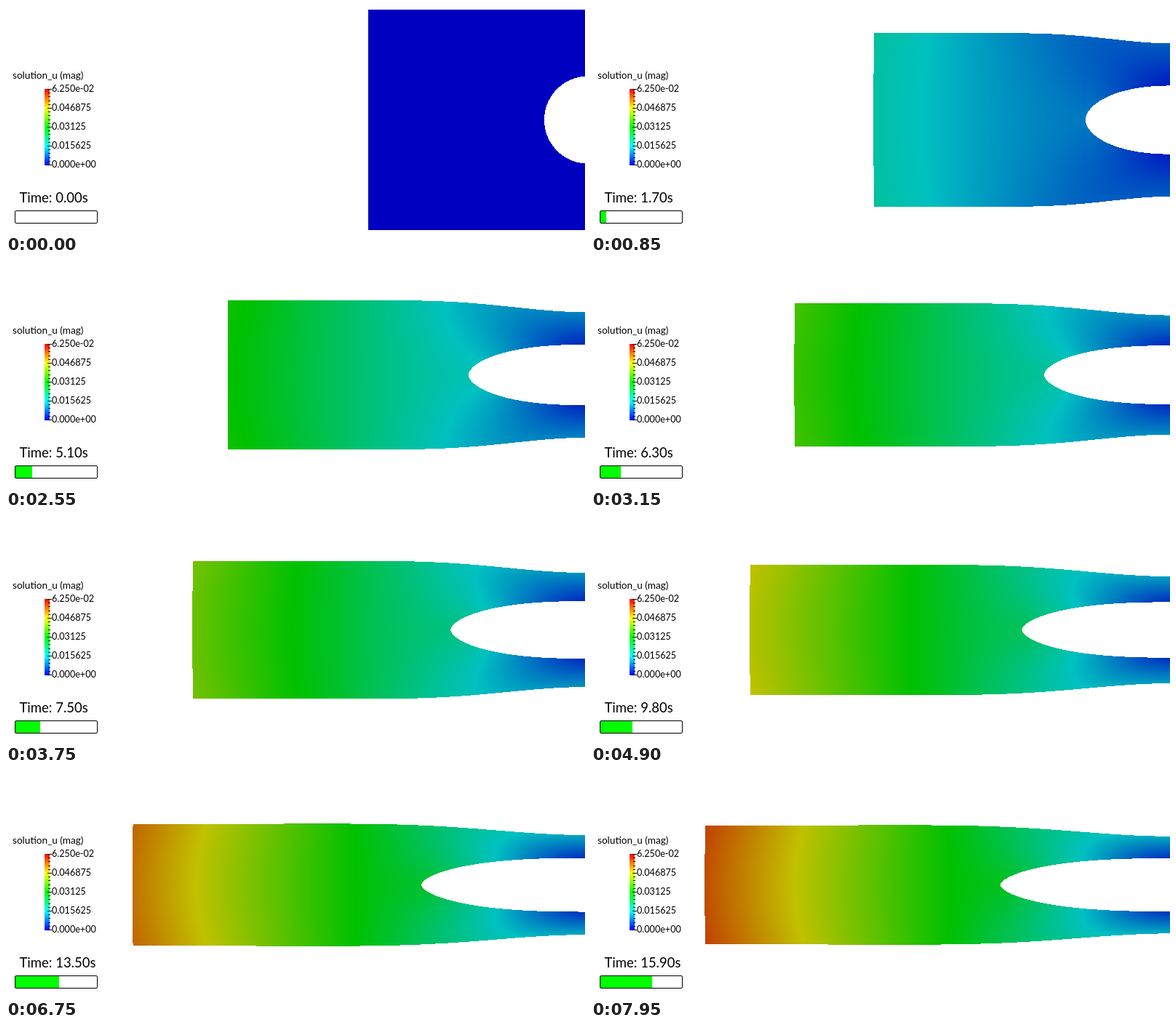
Animation of 796x312 px, one loop 8000 ms. Source, as an HTML page with a canvas:

```html
<!DOCTYPE html>
<html lang="en">
<head>
<meta charset="utf-8">
<title>Stretched plate with a hole</title>
<style>
  html, body { margin: 0; width: 100%; height: 100%; overflow: hidden; background: #fff; }
  canvas, svg { position: absolute; left: 0; top: 0; display: block; }
  text { font-family: Lato, "Open Sans", sans-serif; font-size: 12.6px; }
</style>
</head>
<body>
<canvas id="plate" width="796" height="312"></canvas>
<svg width="796" height="312">
  <defs>
    <linearGradient id="rainbow" x1="0" y1="0" x2="0" y2="1">
      <stop offset="0" stop-color="#f00"/>
      <stop offset=".25" stop-color="#ff0"/>
      <stop offset=".5" stop-color="#0f0"/>
      <stop offset=".75" stop-color="#0ff"/>
      <stop offset="1" stop-color="#00f"/>
    </linearGradient>
  </defs>
  <text x="9" y="100" style="font-size:13.6px">solution_u (mag)</text>
  <rect x="53" y="114" width="7" height="105" fill="url(#rainbow)"/>
  <path id="ticks" stroke="#000" shape-rendering="crispEdges"/>
  <g id="labels"></g>
  <text id="clock" x="18.5" y="270" style="font-size:18.5px"></text>
  <rect id="progress" x="13" y="282" height="16" fill="#0f0" shape-rendering="crispEdges"/>
  <rect x="12.5" y="281.5" width="113" height="17" rx="1.5" fill="none" stroke="#000"/>
</svg>
<script>
const LOOP = 8000, STEP = 50, TOTAL_TIME = 25;
const WIDTH = 796, HEIGHT = 312;
const CX = 800, CY = 156.55;                      // centre of the hole
const HALF_WIDTH = 302, HALF_HEIGHT = 151.5, RADIUS = 60;
const FULL_SCALE = 380, SHADE = 193;              // displacement shown as red, lit brightness

const byId = id => document.getElementById(id);
const clamp = v => Math.min(1, Math.max(0, v));
const ctx = byId('plate').getContext('2d');
const image = ctx.createImageData(WIDTH, HEIGHT);
const pixels = new Uint32Array(image.data.buffer);

function buildLegend() {
  let path = '';
  for (let i = 0; i <= 20; i++) {
    path += `M${i % 5 ? 58 : 57} ${114.5 + i * 5.2}H${i % 5 ? 61 : 63}`;
  }
  byId('ticks').setAttribute('d', path);
  byId('labels').innerHTML = ['6.250e-02', '0.046875', '0.03125', '0.015625', '0.000e+00']
    .map((label, i) => `<text x="63" y="${117.5 + i * 26.1}">${label}</text>`).join('');
}

function rainbow(magnitude) {
  const k = 4 * magnitude / FULL_SCALE;
  const red = SHADE * clamp(k - 2);
  const green = SHADE * clamp(Math.min(k, 4 - k));
  const blue = SHADE * clamp(2 - k);
  return (255 << 24 | blue << 16 | green << 8 | red) >>> 0;
}

// Pull of the free end: quick loading, then slowing creep.
function endPull(time) {
  const s = time - 1.7;
  return Math.min(105 * time, 109 + 27.2 * s - 0.765 * s * s);
}

function drawPlate(pull) {
  const length = HALF_WIDTH + pull;
  const half = HALF_HEIGHT / (1 + 0.0025 * pull);
  const neck = HALF_HEIGHT / (1 + 0.0042 * pull - 1.4e-6 * pull * pull);
  const holeA = RADIUS + 0.568 * pull - 1.4e-4 * pull * pull;
  const holeB = RADIUS / (1 + 0.0028 * pull - 2.7e-6 * pull * pull);
  const neckWidth = 62 + 0.645 * holeA;

  // Horizontal displacement: uniform strain far away, corrected near hole and neck.
  const strain = 1 - half / HALF_HEIGHT;
  const tipPull = holeA - RADIUS;
  const deficit = tipPull + strain * (length - holeA) - pull;
  const deficitLength = deficit / strain || 1;
  const excess = pull - strain * length;
  const neckStrain = 1 - (neck - holeB) / (HALF_HEIGHT - RADIUS);
  const edgeStrain = 2 * neckStrain - tipPull / holeA;
  const excessLength = excess / (edgeStrain - strain) || 1;
  const excessScale = excess / Math.tanh(length / excessLength);

  pixels.fill(0);
  for (let x = 130; x < WIDTH; x++) {
    const d = CX - x - 0.5;
    if (d > length + 1) continue;
    const s2 = (d / neckWidth) ** 2;
    const outer = half - (half - neck) * Math.exp(-s2) * (1 - 0.5 * s2);
    const inner = d < holeA
      ? holeB * (1 - (d / holeA) ** (2 + 1.3 * strain)) ** (0.5 + 0.2 * strain) : 0;
    const beyond = d - holeA;
    const innerU = beyond < 0 ? d * tipPull / holeA
      : tipPull + strain * beyond - deficit * (1 - Math.exp(-beyond / deficitLength));
    const outerU = strain * d + excessScale * Math.tanh(d / excessLength);
    const innerV = inner * (RADIUS / holeB - 1);
    const outerV = HALF_HEIGHT - outer;
    const power = 1 + clamp(beyond / 80);

    for (let y = 0; y < HEIGHT; y++) {
      const h = Math.abs(y + 0.5 - CY);
      if (h > outer || h < inner) continue;
      const bow = 0.7 * clamp(pull / 100) * (1 - (h / outer) ** 2);
      if (d > length + bow) continue;
      const t = (h - inner) / (outer - inner);
      const u = innerU + (outerU - innerU) * t ** power;
      const v = innerV + (outerV - innerV) * t;
      pixels[y * WIDTH + x] = rainbow(Math.hypot(u, v));
    }
  }
  ctx.putImageData(image, 0, 0);
}

const start = performance.now();
let shownStep = -1;

function frame() {
  const step = Math.floor((performance.now() - start) % LOOP / STEP);
  if (step !== shownStep) {
    shownStep = step;
    const time = step / 10;
    drawPlate(endPull(time));
    byId('clock').textContent = `Time: ${time.toFixed(2)}s`;
    byId('progress').setAttribute('width', 112 * time / TOTAL_TIME);
  }
  requestAnimationFrame(frame);
}

buildLegend();
frame();
</script>
</body>
</html>
```
